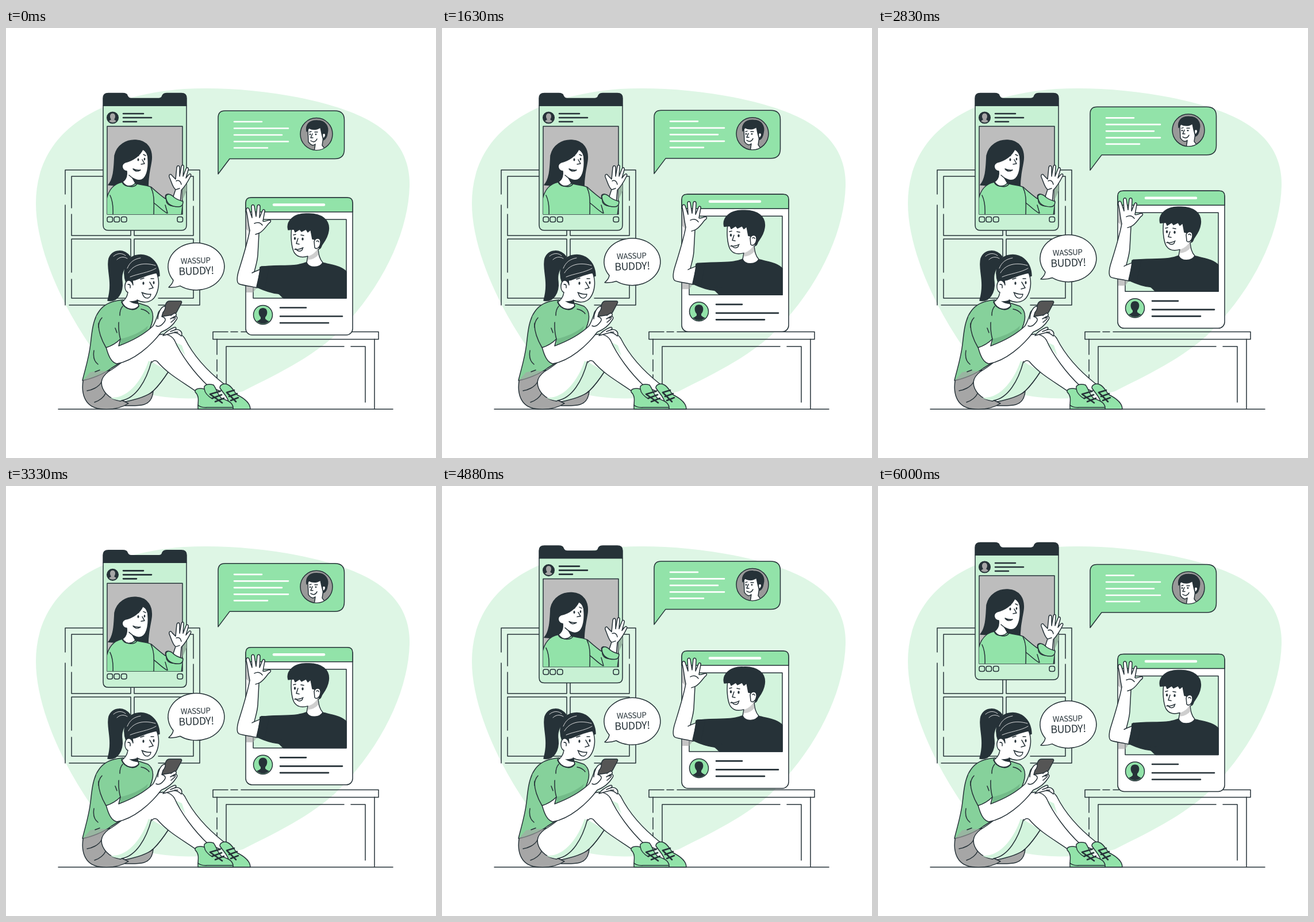
Write an HTML page that moves like this. It is 748 px wide and 748 px high and loops after 6040 ms.

```html
<!DOCTYPE html>
<html lang="en">
<head>
<meta charset="utf-8">
<title>Friends chatting</title>
<style>
html, body { margin: 0; height: 100%; overflow: hidden; background: #fff; }
svg { display: block; width: 100vw; height: 100vh; fill: none; stroke: #263238; stroke-width: 1.5; stroke-linecap: round; stroke-linejoin: round; }
.white { fill: #fff; }
.dark { fill: #263238; }
.green { fill: #92e3a9; }
.tee { fill: #86d19b; }
.pale { fill: #c8f1d4; }
.mint { fill: #d3f4dd; }
.grey { fill: #a6a6a6; }
.flat { stroke: none; }
.bar { stroke-width: 2.6; }
.light { stroke: #fff; stroke-width: 2.6; }
text { font-family: "Noto Sans CJK SC", "Noto Sans CJK JP", "Noto Sans", sans-serif; font-weight: 500; letter-spacing: -.03em; text-anchor: middle; fill: #263238; stroke: none; }
</style>
</head>
<body>
<svg viewBox="0 0 748 748">
  <defs>
    <clipPath id="photo"><path d="M176 171H307V324H176Z"/></clipPath>
    <clipPath id="round"><circle cx="540" cy="184.500" r="27.500"/></clipPath>
  </defs>

  <path class="flat" fill="#def6e5" d="M52 305C52 200 130 120 310 106C420 100 560 122 630 160C685 190 703 230 702 275C700 355 655 455 570 537C520 580 465 605 412 632C350 650 260 650 205 622C150 575 52 420 52 305Z"/>

  <!-- window -->
  <path d="M103 482V308M103 289V247H337V482H265M110 482H196
    M114 313V258H217V361H114V324M114 425V367H217V470H114V437
    M326 300V258H223V361H326V310M265 470H326V367H223V470"/>

  <!-- table and floor -->
  <path d="M386 528.500H360V541.500H648V528.500H409M391 528.500H403
    M367 541V568M367 577V597M367 603V620M641 541V662M383 622V554H588M600 554H625V651M91 663H673"/>

  <!-- phone -->
  <g data-delay="3000">
    <path class="pale" d="M169 135V343Q169 352 178 352H305Q314 352 314 343V135Z"/>
    <path class="dark" d="M169 135V122Q169 113.500 178 113.500H203Q210 113.500 211 117.500Q213 122.500 218 122.500H266Q271 122.500 272 117.500Q274 113.500 280 113.500H305Q314 113.500 314 122V135Z"/>
    <circle class="dark" cx="185.500" cy="156" r="9.800"/>
    <path class="grey flat" d="M185.500 148.500C191 148.500 191 156 188 159L192 162Q186 167 179 162L183 159C180 156 180 148.500 185.500 148.500Z"/>
    <path class="bar" d="M204 149H239M204 156H253M204 163H227"/>
    <path fill="#bdbdbd" d="M176 171H307V324H176Z"/>
    <g clip-path="url(#photo)">
      <path class="dark" d="M189 222C193 203 210 194 226 195C247 196 255 212 253 230C251 245 247 255 247 278L178 273C188 262 188 240 189 222Z"/>
      <path class="green" d="M174 302C178 280 188 271 202 268L228 271C240 274 248 274 253 277C262 285 271 293 279 298C275 291 279 287 285 290L308 303L305 326H174Z"/>
      <path d="M181 291C184 297 187 305 186 325M252 277C257 287 258 296 257 325M257 304C264 309 271 317 280 322M279 298C278 304 282 310 294 310M277 308L281 322"/>
    </g>
    <path class="white" d="M207 234C221 231 233 222 238 211C244 214 247 220 247 228C248 241 246 256 239 262C233 267 225 264 220 261L225 270C217 278 205 276 202 268C209 264 211 258 210 249C202 248 199 238 207 234Z"/>
    <path d="M237 229L241 236L235 237M226 222L231 222M239 220L243 222M220 261L214 256M203 268C210 279 224 277 228 271"/>
    <path class="white" d="M221 245Q226 252 234 247Q226 248 221 245Z"/>
    <g class="dark flat"><ellipse cx="230" cy="229" rx="1.500" ry="2.500"/><ellipse cx="241" cy="228" rx="1.300" ry="2.300"/></g>
    <path class="flat" fill="#9ab7a3" d="M307 279L314 267V283L307 300Z"/>
    <path class="white" d="M291 293L295 281C290 278 288 268 284 259C283 254 287 253 289 257L295 263L297 243C298 238 302 239 302 243L302 258L305 241C306 237 310 238 309 242L308 258L313 245C315 241 318 243 317 247L313 261L317 256C320 252 323 254 321 258C316 268 311 276 305 282L303 305C297 303 292 299 291 293Z"/>
    <path class="green" d="M278 293C281 286 288 290 293 295C298 299 304 300 308 302C308 308 305 311 300 311C289 311 279 307 278 293Z"/>
    <path d="M296 281L302 279M296 266C301 264 304 267 305 272"/>
    <path d="M179 328.500h3.500a3 3 0 0 1 3 3v3a3 3 0 0 1-3 3h-3.500a3 3 0 0 1-3-3v-3a3 3 0 0 1 3-3Z" id="icon"/>
    <use href="#icon" x="12"/><use href="#icon" x="24.500"/><use href="#icon" x="122"/>
  </g>

  <!-- chat balloon -->
  <g data-delay="1500">
    <path class="green" d="M369 254V156Q369 144 381 144H572Q588.500 144 588.500 160V211Q588.500 227.500 572 227.500H389Z"/>
    <path class="light" d="M397 163H445M397 174.500H491M397 186H480M397 197.500H491M397 208.500H455"/>
    <circle fill="#999" cx="540" cy="184.500" r="28"/>
    <g clip-path="url(#round)">
      <path class="white" d="M525 174L526 198C531 205 535 205 538 202L536 216H559L550 204L552 190C558 188 557 178 552 180L548 170Z"/>
      <path class="dark" d="M523 180C521 168 528 160 542 161C556 161 562 172 559 183C558 190 555 194 552 195L549 183L547 173C540 178 532 177 527 174Z"/>
      <path class="white" d="M551 184C556 181 558 188 552 192"/>
      <path d="M533 184L530 191L534 191M530 196Q537 201 541 193M528 181L531 180M537 181L542 181"/>
      <g class="dark flat"><circle cx="529" cy="185" r="1.400"/><circle cx="539" cy="185" r="1.400"/></g>
    </g>
  </g>

  <!-- profile card -->
  <g data-delay="500">
    <rect class="white" x="417" y="295" width="186" height="239" rx="11"/>
    <path class="green" d="M417 320V304Q417 295 426 295H594Q603 295 603 304V320Z"/>
    <path class="light" style="stroke-width:4.500" d="M466 307.500H553"/>
    <path class="mint" d="M430 333H592V470H430Z"/>
    <path class="flat grey" opacity=".65" d="M418 320V350L424 356V334ZM418 448L436 452L430 460H418Z"/>
    <path class="dark" d="M442 416C470 411 500 417 522 408L550 408C568 413 583 414 592 424V470H483C478 466 476 462 473 462C461 461 448 456 437 451Z"/>
    <path class="white" d="M497 348C495 360 496 380 501 390C506 398 515 400 525 397L523 408C528 419 546 417 551 408C545 401 544 394 543 385C550 384 552 370 545 367L540 348Z"/>
    <path class="flat grey" opacity=".55" d="M526 397Q537 393 542 384L544 394Q535 404 524 403Z"/>
    <path class="dark" d="M491 351C487 337 500 322 524 323C549 322 564 334 561 353C559 368 550 375 546 383L541 381L537 368L533 367L530 351L525 355L522 350L514 354L511 350L503 355L501 350Z"/>
    <path class="white" d="M536 371C539 364 548 364 547 374C546 382 540 386 537 382Z"/>
    <path d="M540 371Q543 369 544 372M508 366L505 375L510 376M504 384C509 391 516 388 516 383M502 385Q510 386 517 382M500 360L504 359M513 360L518 361M466 460C474 455 478 456 487 457"/>
    <g class="dark flat"><ellipse cx="502.500" cy="366" rx="1.700" ry="2.600"/><ellipse cx="516" cy="367" rx="1.700" ry="2.600"/></g>
    <path class="white" d="M424 352C421 340 421 330 418 318C417 313 421 311 423 315L428 330L427 311C427 307 431 306 432 310L435 328L437 310C438 306 442 307 442 311L441 330L446 318C447 314 451 316 450 319L447 336C449 338 455 334 459 334C462 335 460 338 457 340C451 347 447 354 440 357L438 395C437 407 434 415 432 424L442 420L437 452C425 449 412 448 405 445C401 442 402 433 404 425C410 405 420 375 424 352Z"/>
    <path d="M440 357L434 359M432 340C438 337 443 339 446 343M432 424L428 426"/>
    <path class="dark" d="M444 415L436 450L450 455L458 415Z"/>
    <circle class="green" cx="447" cy="499" r="16.500"/>
    <path class="dark flat" d="M447 487C456 487 456 498 451 503L451 506Q454 509 458 510Q447 519 436 510Q440 509 443 506L443 503C438 498 438 487 447 487Z"/>
    <path class="bar" d="M477 486.500H522M477 501.500H585M477 513H561"/>
  </g>

  <!-- speech balloon -->
  <g data-delay="0">
    <path class="white" d="M303 448.600Q293 452 283 451Q290 445 291 438.700A49 41 0 1 1 303 448.600Z"/>
    <g transform="rotate(-2 331 414)">
      <text x="330" y="409.500" font-size="13.500">WASSUP</text>
      <text x="330.500" y="429" font-size="18">BUDDY!</text>
    </g>
  </g>

  <!-- seated girl: far leg and shoe -->
  <path class="white" d="M277 531C290 526 305 530 311 540C326 570 352 598 380 620L373 632L350 622L283 597C268 620 250 645 218 652L205 640Z"/>
  <path class="mint flat" d="M254 581L283 598C268 620 248 645 214 651L208 645C232 630 244 603 254 581ZM284 542C292 548 300 555 312 570L306 552Z"/>
  <path d="M283 597C268 620 250 645 218 652"/>
  <path class="green" d="M372 626C372 620 380 617 387 621C394 625 396 632 402 638C412 643 425 652 425 663H388C390 645 380 638 372 626Z"/>
  <path stroke-width="2.600" d="M384 634L397 630M388 641L402 636M391 648L404 643M384 634L400 650"/>

  <!-- shorts and shirt -->
  <path class="grey" d="M207 650C228 646 244 641 256 632C255 643 250 652 240 655C229 658 218 657 207 657Z"/>
  <path class="grey" d="M135 608C129 638 138 662 169 663C188 664 201 661 213 653L185 640L181 595Z"/>
  <path class="tee" d="M204 473C185 474 170 480 161 494C150 510 149 535 147 550C144 575 138 592 133 613C147 611 170 602 183 592L215 572L250 524C257 508 259 493 247 484L232 479C222 490 207 486 204 473Z"/>
  <path class="flat" fill="#68ad7e" opacity=".6" d="M199 541C217 537 235 529 247 518L243 533L200 556Z"/>
  <path class="flat grey" d="M146 599C155 597 170 595 181 598L163 612L134 613Z" opacity=".6"/>

  <!-- near leg and shoe -->
  <path class="white" d="M179 597C203 584 239 548 261 536C273 529 287 533 293 543C304 568 327 600 352 623L336 636C312 618 283 604 263 580C257 576 253 581 250 589C241 615 226 643 199 649C179 646 166 631 166 616Q167 606 179 597Z"/>
  <path class="mint flat" d="M254 582C245 613 227 644 201 648C192 647 186 646 182 643C213 645 237 612 248 579Z"/>
  <path d="M253 580C244 614 226 644 201 648M166 616C161 625 149 630 141 631M173 636C169 644 163 648 154 651"/>
  <path class="green" d="M329 633C328 627 337 626 345 628C343 621 351 618 361 621C367 629 368 639 376 645C388 648 396 654 395 663H334C333 651 338 642 329 633Z"/>
  <path d="M334 656Q340 661 350 660H394M345 628C346 635 352 641 359 645"/>
  <path stroke-width="2.600" d="M355 637L372 632M359 644L375 638M364 650L379 644M355 637L376 652"/>

  <!-- far hand -->
  <path class="white" d="M273 535C278 528 285 524 292 521C296 519 297 523 294 525C302 523 308 529 305 536C299 530 293 529 288 531Z"/>
  <path d="M286 528L294 525M293 529L299 529"/>

  <!-- near arm, phone in hand -->
  <path class="white" d="M174 555C178 570 183 582 193 584C222 579 252 553 270 529C280 525 290 518 296 508C300 503 296 500 292 502L294 496C293 490 288 492 286 495L276 492C269 488 265 492 264 499C261 507 259 514 255 519C239 534 215 546 196 553L199 541Z"/>
  <path fill="#555" d="M278 480Q280 475 285 475H303Q307 475 305 479L297 494Q295 498 290 499L270 502Z"/>
  <path class="white" d="M264 506C264 497 269 486 275 484C279 484 277 490 273 495L271 502C278 504 279 508 274 513C270 518 265 520 261 518"/>
  <path class="white" d="M287 500L293 496Q297 496 296 500L291 505M286 506L293 502Q296 503 293 507L287 512"/>
  <path class="tee" d="M161 512C160 528 167 544 174 556C184 553 193 547 199 541C194 523 196 507 198 496L180 490Z"/>
  <path class="flat tee" d="M157 502C166 485 185 480 199 484L198 511L163 521Z"/>
  <path d="M198 500C198 492 200 487 203 484M161 521C161 513 163 508 167 504M153 561C151 573 153 580 160 585M155 598L163 595M235 489C241 490 246 493 249 497M193 530L190 522"/>

  <!-- head -->
  <path class="dark" d="M216 398C207 384 185 384 179 401C174 420 187 440 177 474C194 478 204 459 202 441C199 423 210 413 216 398Z"/>
  <path class="dark" d="M209 443C202 424 207 402 224 396C246 390 266 404 267 431L255 436L222 449Z"/>
  <path class="white" d="M220 439C228 439 236 431 262 426C268 440 266 458 258 469C250 479 236 478 228 473L231 484C223 495 206 489 201 477C208 473 211 466 212 460C204 456 206 438 214 439Q219 440 221 447Z"/>
  <path class="dark flat" d="M214 475C220 476 225 474 229 473L231 480C224 480 218 478 214 475Z"/>
  <path d="M212 446Q217 445 216 452M250 442L256 452L249 454M236 460Q245 464 252 463C251 472 240 473 237 461M234 437L240 435M252 436L257 436M201 475C207 492 226 492 231 483"/>
  <g class="dark flat"><ellipse cx="239" cy="444" rx="1.600" ry="2.800"/><ellipse cx="257" cy="443" rx="1.500" ry="2.700"/></g>
  <path stroke="#eee" stroke-width=".9" d="M213 426C222 411 239 407 260 413M216 433C230 427 247 426 261 418M211 418C215 408 222 402 234 400M187 397C194 391 202 391 208 396M193 403C198 398 205 397 211 401"/>
</svg>
<script>
const loop = 6040, half = 3000, rise = 15;
const floats = [...document.querySelectorAll('[data-delay]')];

// Each part waits, then glides up and back down at constant speed.
function draw(now) {
  const t = now % loop;
  for (const el of floats) {
    const u = (t - el.dataset.delay) / half;
    const lift = rise * Math.max(0, 1 - Math.abs(1 - u));
    el.setAttribute('transform', `translate(0 ${-lift})`);
  }
}

const start = performance.now();
function tick() {
  draw(performance.now() - start);
  requestAnimationFrame(tick);
}
tick();
</script>
</body>
</html>
```
